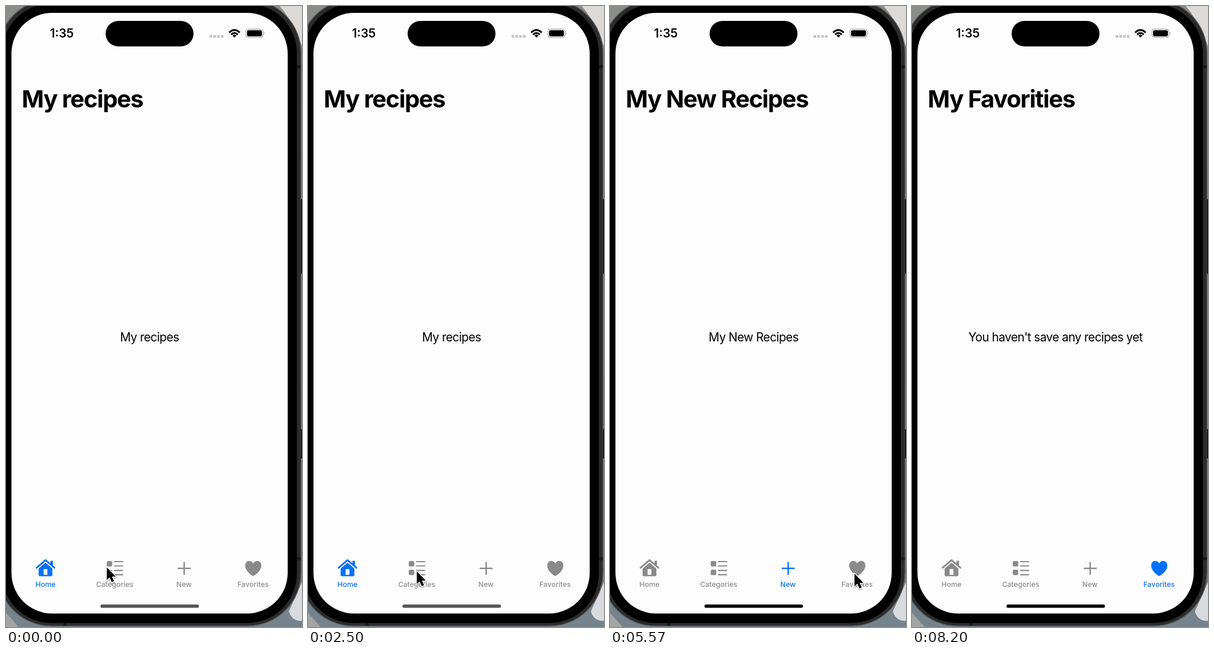
An HTML page that plays this animation: 517x1083 px, repeating every 8310 ms.

```html
<!DOCTYPE html>
<html lang="en">
<head>
<meta charset="utf-8">
<title>Recipe tabs</title>
<style>
  html, body { margin: 0; width: 100%; height: 100%; overflow: hidden; background: #777; }
  svg { display: block; width: 517px; height: 1083px; }
  text { font-family: Inter, Roboto, sans-serif; font-optical-sizing: none; }
  #title { font-size: 41.7px; font-weight: 700; letter-spacing: -1.35px; }
  #body { font-size: 20.9px; letter-spacing: -.62px; text-anchor: middle; }
  #clock { font-size: 20.9px; font-weight: 600; text-anchor: middle; }
  .tab { color: #8a8a8a; }
  .tab.on { color: #0571fb; }
  .tab text { font-size: 12.3px; font-weight: 500; letter-spacing: .1px; text-anchor: middle; fill: currentColor; }
  .tab .fill { fill: currentColor; }
  .tab .line { fill: none; stroke: currentColor; stroke-linecap: round; stroke-linejoin: round; }
</style>
</head>
<body>
<svg viewBox="0 0 517 1083">
  <defs>
    <linearGradient id="backdrop" x2="0" y2="1">
      <stop offset="0" stop-color="#8b8d8a"/>
      <stop offset="1" stop-color="#75838c"/>
    </linearGradient>
    <filter id="shadow" x="-50%" y="-50%" width="200%" height="200%">
      <feDropShadow dx="0" dy="1.5" stdDeviation="1.3" flood-opacity=".4"/>
    </filter>
  </defs>

  <!-- Desktop and phone -->
  <rect width="517" height="1083" fill="url(#backdrop)"/>
  <path d="M478 0H517V70Q500 25 478 0Z" fill="#dcd9d7"/>
  <path d="M517 1005V1072Q500 1074 494 1056Z" fill="#d9dade"/>
  <path d="M0 1058L22 1083H0Z" fill="#a3a5a3"/>
  <rect x="-15" y="-12" width="531" height="1094" rx="94" fill="#5b5b5b"/>
  <rect x="-13.500" y="-10.500" width="528" height="1091" rx="92.500" fill="#2b2b2b"/>
  <path d="M508 106H515M508 964H515M103 1076V1081" stroke="#181818" stroke-width="5"/>
  <path d="M516 337V467M516 738V789" stroke="#161616" stroke-width="2"/>
  <rect x="-7" y="-4" width="515" height="1080" rx="86"/>
  <rect x="9.500" y="12" width="482.500" height="1047.500" rx="71" fill="#fdfdfd"/>

  <!-- Status bar -->
  <rect x="174" y="26" width="153.500" height="44.500" rx="22.250"/>
  <text id="clock" x="97.500" y="55">1:35</text>
  <path d="M355.500 53H380" stroke="#c2c2c2" stroke-width="4.500" stroke-dasharray="4.600 2"/>
  <g fill="none" stroke="#000" stroke-width="3.100">
    <path d="M389.800 46.300Q399 37.400 408.200 46.300"/>
    <path d="M393.200 49.900Q399 44.300 404.800 49.900"/>
  </g>
  <path d="M395.500 51.500Q399 48.400 402.500 51.500L399 55Z"/>
  <rect x="419" y="40.300" width="30" height="14.600" rx="4.800" fill="none" stroke="#a3a3a3" stroke-width="1.200"/>
  <rect x="421" y="42.300" width="26" height="10.600" rx="3"/>
  <path d="M450.600 45.200Q453 47.600 450.600 50Z" fill="#a3a3a3"/>

  <!-- Page -->
  <text id="title" x="27.500" y="177"></text>
  <text id="body" x="250.700" y="584.700"></text>

  <!-- Tab bar -->
  <g class="tab">
    <path class="line" stroke-width="3" d="M53.500 979.700L69 966.300L84.500 979.700"/>
    <path class="fill" d="M77.700 967.500H82V977L77.700 973.500Z"/>
    <path class="fill" fill-rule="evenodd" d="M57 981L69 970.700L81 981V992Q81 994.500 78.500 994.500H59.500Q57 994.500 57 992ZM65.700 982V992H72.300V982Z"/>
    <text x="69" y="1013">Home</text>
  </g>
  <g class="tab">
    <rect class="fill" x="176" y="968" width="9.500" height="9.500" rx="2.200"/>
    <rect class="fill" x="176" y="983" width="9.500" height="9.500" rx="2.200"/>
    <path class="line" stroke-width="2.200" d="M189.500 969H203.700M189.500 976.500H203.700M189.500 984.300H203.700M189.500 991.800H203.700"/>
    <text x="190" y="1013">Categories</text>
  </g>
  <g class="tab">
    <path class="line" stroke-width="2.500" d="M301 980.700H321.500M311.200 970.400V991"/>
    <text x="311" y="1013">New</text>
  </g>
  <g class="tab">
    <path class="fill" d="M431.800 994.300C426 991 417.800 984 417.800 976C417.800 966.500 428 965.300 431.800 972C435.600 965.300 446 966.500 446 976C446 984 437.600 991 431.800 994.300Z"/>
    <text x="431.700" y="1013">Favorites</text>
  </g>
  <rect id="bar" x="165" y="1043.800" width="172" height="5.800" rx="2.900"/>

  <path id="cursor" d="M0 0V22L5 17.400L8.700 25.700L12.600 24L9 16H15.700Z"
        stroke="#fff" stroke-width="2.600" stroke-linejoin="round" paint-order="stroke" filter="url(#shadow)"/>
</svg>
<script>
const LOOP = 8310, CURSOR_GONE = 6330;

// start time, title, message, tab index
const pages = [
  [0, "My recipes", "My recipes", 0],
  [2570, "My Catagory", "My catagory", 1],
  [4330, "My New Recipes", "My New Recipes", 2],
  [5700, "My Favorities", "You haven't save any recipes yet", 3]
];

// time, x, y of the pointer tip
const path = [
  [0, 176, 979], [300, 176, 979], [1100, 73, 993], [1750, 73, 993],
  [2350, 190, 986], [3100, 190, 986], [4040, 309, 985], [4600, 309, 985],
  [5346, 427, 990], [6030, 427, 990], [6240, 11, 56], [6280, 11, 56],
  [CURSOR_GONE, -25, 30]
];

const $ = id => document.getElementById(id);
const tabs = document.querySelectorAll(".tab");
const ease = u => u * u * (3 - 2 * u);

function pointerAt(t) {
  const i = path.findIndex(key => key[0] > t);
  const [t0, x0, y0] = path[i - 1], [t1, x1, y1] = path[i];
  const u = ease((t - t0) / (t1 - t0));
  return [x0 + (x1 - x0) * u, y0 + (y1 - y0) * u];
}

let shown;
function showPage(page) {
  if (page === shown) return;
  shown = page;
  const [, title, message, active] = page;
  $("title").textContent = title;
  $("body").textContent = message;
  tabs.forEach((tab, i) => tab.classList.toggle("on", i === active));
  $("bar").setAttribute("fill", active ? "#000" : "#555");
}

function draw() {
  const t = performance.now() % LOOP;
  showPage(pages.findLast(page => page[0] <= t));
  const visible = t < CURSOR_GONE;
  $("cursor").style.display = visible ? "" : "none";
  if (visible) $("cursor").setAttribute("transform", `translate(${pointerAt(t)})`);
  requestAnimationFrame(draw);
}
draw();
</script>
</body>
</html>
```
